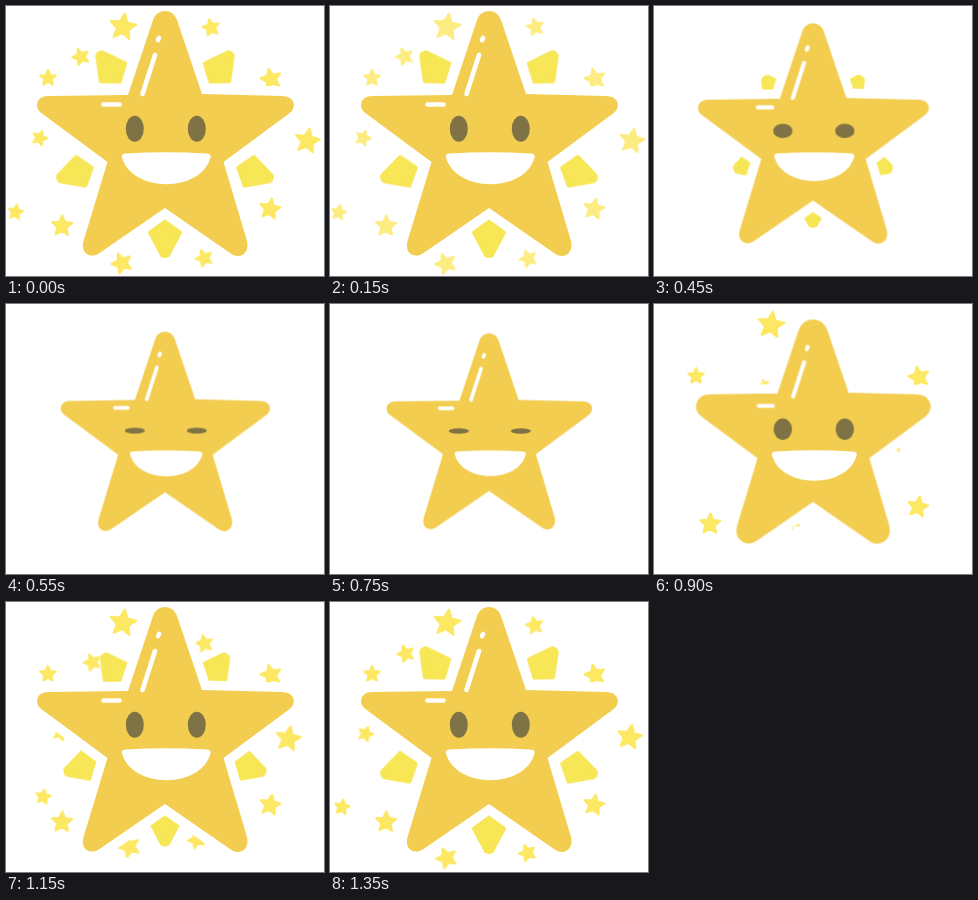
These frames come from a looping animation (318x270 px, 1400 ms). An HTML page:

```html
<!DOCTYPE html>
<html lang="en">
<head>
<meta charset="utf-8">
<title>Happy star</title>
<style>
  html, body { margin: 0; width: 100%; height: 100%; overflow: hidden; background: #fff; }
  svg { display: block; width: 318px; height: 270px; }

  /* cubic-bezier(1/3, 0, 2/3, 1) is a smoothstep */
  .star, .halo, .body, .eyes, .eye, .mouth, .ray {
    animation: 1400ms cubic-bezier(.3333, 0, .6667, 1) infinite;
  }
  .star { transform-origin: 159px 127px; animation-name: shrink; }
  .halo, .body { stroke-linejoin: round; vector-effect: non-scaling-stroke; animation-name: puff; }
  .halo { fill: #fff; stroke: #fff; --thin: 19px; --thick: 27px; }
  .body { fill: #f3cd4f; stroke: #f3cd4f; --thin: 0px; --thick: 8px; }
  .shine { fill: none; stroke: #fff; stroke-width: 4.6px; stroke-linecap: round; }
  .eyes { animation-name: sink; }
  .eye { fill: #7f7345; transform-box: fill-box; transform-origin: center; animation-name: blink; }
  .mouth { fill: #fff; transform-origin: 160px 147px; animation-name: smile; }
  .ray {
    fill: #f7e655; stroke: #f7e655; stroke-width: 4px; stroke-linejoin: round;
    animation-name: slide;
  }

  .spark {
    fill: #fde863; stroke: #fde863; stroke-width: 2px; stroke-linejoin: round;
    transform-origin: 0 0; animation: 1400ms linear infinite;
  }
  .pop { animation-name: pop; animation-delay: -650ms; }
  .drift { animation-name: drift; animation-delay: -550ms; }

  @keyframes shrink {
    0%, 21.43% { transform: scale(1); }
    42.86%, 54.29% { transform: scale(.8); }
    77.14%, 100% { transform: scale(1); }
  }
  @keyframes puff {
    0%, 54.29% { stroke-width: var(--thin); }
    64.29% { stroke-width: var(--thick); }
    77.14%, 100% { stroke-width: var(--thin); }
  }
  @keyframes sink {
    0%, 21.43% { transform: translateY(0); }
    42.86%, 54.29% { transform: translateY(4.3px); }
    77.14%, 100% { transform: translateY(0); }
  }
  @keyframes blink {
    0%, 21.43% { transform: scale(1); }
    41.43%, 52.86% { transform: scale(1.12, .21); }
    69.29%, 100% { transform: scale(1); }
  }
  @keyframes smile {
    0%, 21.43% { transform: scale(1); }
    42.86%, 52.86% { transform: scale(.8); }
    69.29%, 100% { transform: scale(1); }
  }
  @keyframes slide {
    0%, 21.43% { transform: translateY(0); }
    42.86%, 60.71% { transform: translateY(-60px); }
    88.36%, 100% { transform: translateY(0); }
  }
  @keyframes pop {
    0% {
      translate: 159px 127px; scale: .3; opacity: 1;
      animation-timing-function: cubic-bezier(.34, 1.56, .64, 1);
    }
    8% { scale: 1; }
    29.3% { translate: var(--to); }
    53.57% { opacity: 1; }
    72.86%, 100% { translate: var(--to); scale: 1; opacity: 0; }
  }
  @keyframes drift {
    0% {
      translate: var(--from); scale: .4; opacity: 1;
      animation-timing-function: cubic-bezier(.3333, .5833, .6667, 1);
    }
    18% { scale: 1; }
    42.86% { translate: var(--to); }
    46.43% { opacity: 1; }
    65.71%, 100% { translate: var(--to); scale: 1; opacity: 0; }
  }
</style>
</head>
<body>
<svg viewBox="0 0 318 270" xmlns="http://www.w3.org/2000/svg">
  <g id="sparks"></g>
  <g id="rays"></g>
  <g class="star">
    <path class="halo"/>
    <path class="body" d="M122 89L147 14C151 2 167 2 171 14L196 88L276 90C288 90 292 101 283 107.5L217.5 156L241 235C244 248 233 254 224 247L159 202L95 246C85 254 74 248 77.5 235L101.5 156L36 107.5C27 101 31 90 42 90Z"/>
    <path class="shine" d="M97.5 98.5H113.5M149 49L136.5 88M152 34.2L153 31.8"/>
  </g>
  <g class="eyes">
    <ellipse class="eye" cx="128.8" cy="122.7" rx="9" ry="13"/>
    <ellipse class="eye" cx="190.8" cy="122.7" rx="9" ry="13"/>
  </g>
  <path class="mouth" d="M116 151.5Q115 147.5 120 147.5Q160 145 200 147.5Q205.5 147.5 204.5 151.5C195 187 126 187 116 151.5Z"/>
</svg>
<script>
  const polar = (r, deg) => {
    const a = deg * Math.PI / 180;
    return [r * Math.sin(a), -r * Math.cos(a)].map(v => v.toFixed(2)).join();
  };
  const starPoints = (r, turn) =>
    Array.from({ length: 10 }, (_, i) => polar(i % 2 ? r * .47 : r, turn + i * 36)).join(' ');
  const px = (x, y) => `${x.toFixed(2)}px ${y.toFixed(2)}px`;
  const spark = (kind, r, turn, vars) =>
    `<polygon class="spark ${kind}" points="${starPoints(r - .4, turn)}" style="${vars}"/>`;

  // x, y, radius, turn
  const pops = [
    [117, 21, 14, 8], [42, 72, 8.5, 0], [265, 73, 11, -14], [264, 203, 11, 10], [56, 220, 11, 2]
  ];
  // x, y, radius, turn, then an earlier point on the path
  const drifts = [
    [205, 22, 9, -12, 198, 43], [75, 51, 9, -20, 87, 61], [34, 132, 8, 20, 56, 131],
    [301, 135, 13, 10, 281, 137], [10, 206, 8, 10, 39, 194],
    [116, 257, 11, -22, 124, 244], [198, 252, 9, -22, 190, 237]
  ];

  document.getElementById('sparks').innerHTML =
    drifts.map(([x, y, r, turn, x1, y1]) => {
      const end = [x + (x - x1) * .045, y + (y - y1) * .045];
      const from = [end[0] + (x1 - end[0]) * 3.36, end[1] + (y1 - end[1]) * 3.36];
      return spark('drift', r, turn, `--from:${px(...from)};--to:${px(...end)}`);
    }).join('') +
    pops.map(([x, y, r, turn]) => spark('pop', r, turn, `--to:${px(x, y)}`)).join('');

  document.getElementById('rays').innerHTML = [0, 72, 144, 216, 288].map(deg =>
    `<g transform="rotate(${deg} 159 138)">
      <path class="ray" d="M159 215L144 226.5L156 249Q159 251 162 249L174 226.5Z"/>
    </g>`).join('');

  const shape = document.querySelector('.body').getAttribute('d');
  document.querySelector('.halo').setAttribute('d', shape);
</script>
</body>
</html>
```
